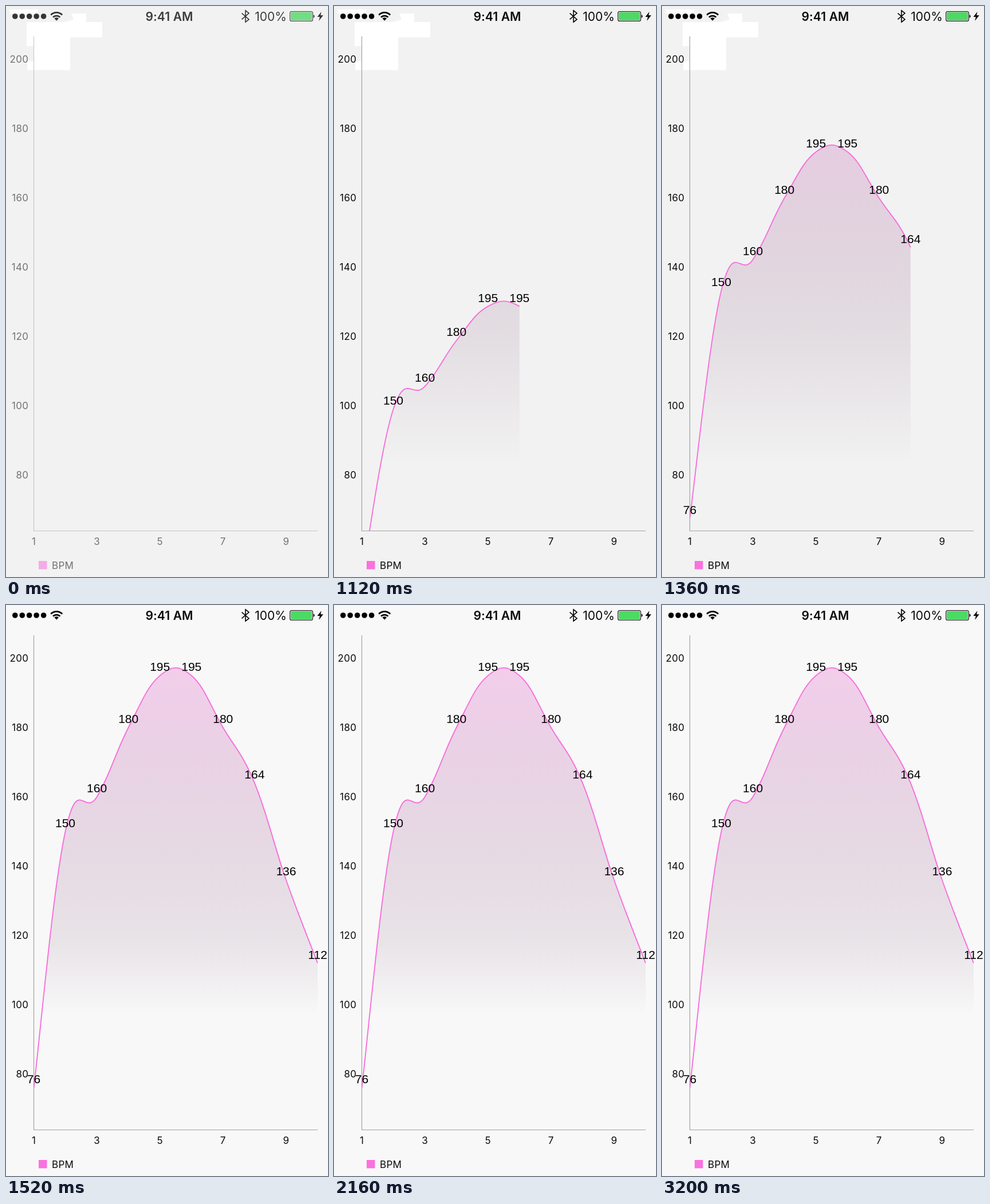
An HTML page for the animation above (3280 ms loop, 562 by 997 pixels).

```html
<!DOCTYPE html>
<html lang="en">
<head>
<meta charset="utf-8">
<title>BPM chart</title>
<style>
  html, body { margin: 0; width: 100%; height: 100%; overflow: hidden; background: #f2f2f2; }
  svg { display: block; width: 562px; height: 997px; }
  text { font: 17px Inter, Roboto, sans-serif; letter-spacing: .3px; fill: #0a0a0a; }
  #status text { font-size: 21px; letter-spacing: 0; }
  #status .clock { font-weight: 600; letter-spacing: .1px; }
  #values text { font: 21px "Liberation Sans", Arial, sans-serif; letter-spacing: 0; fill: #000; }
  .mid { text-anchor: middle; }
  .end { text-anchor: end; }
</style>
</head>
<body>
<svg viewBox="0 0 562 997" xmlns="http://www.w3.org/2000/svg">
  <defs>
    <linearGradient id="shade" gradientUnits="userSpaceOnUse" x1="0" y1="53" x2="0" y2="916">
      <stop offset="0" stop-color="#f76fdc" stop-opacity=".32"/>
      <stop offset=".628" stop-color="#5c2952" stop-opacity=".095"/>
      <stop id="fadeEnd" offset=".866" stop-color="#5c2952" stop-opacity="0"/>
    </linearGradient>
    <clipPath id="plot"><rect x="48.5" y="53" width="495.5" height="863.5"/></clipPath>
  </defs>
  <rect id="back" width="562" height="997"/>
  <path id="patch" fill="#fff" d="M7 6H56V13H7ZM114 13H140V28H168V55H112V112H37V96H48V70H36V28H102L118 24Z"/>

  <g id="status">
    <g id="dots"></g>
    <g fill="none" stroke="#000" stroke-width="2.7">
      <path d="M78.2 15.6A14 14 0 0 1 98.2 15.6"/>
      <path d="M82 19.6A8.8 8.8 0 0 1 94.4 19.6"/>
    </g>
    <path d="M84.4 21.8A5.6 5.6 0 0 1 92 21.8L88.2 25.8Z"/>
    <text class="mid clock" x="285" y="25.5">9:41 AM</text>
    <path d="M411.5 12.6L424 23.4L418 28.2V7.8L424 12.6L411.5 23.4" fill="none" stroke="#000" stroke-width="1.6"/>
    <text class="end" x="490" y="25.5">100%</text>
    <rect x="495.6" y="9.6" width="39.8" height="16.8" rx="3" fill="none" stroke="#222" stroke-width="1.2"/>
    <rect x="497" y="11" width="37" height="14" rx="1.8" fill="#4cd964"/>
    <path d="M536.6 15Q538.6 16 538.6 18T536.6 21Z"/>
    <path d="M550.5 10L543.3 19H547.8L546 26L553.7 16.3H549Z"/>
  </g>

  <g id="frame">
    <path d="M48.5 53V916.5H544" fill="none" stroke="#a2a2a2" stroke-width="1.2"/>
    <g id="ticks"></g>
    <rect x="57" y="969" width="14.5" height="14.5" fill="#f972de"/>
    <text x="80" y="983">BPM</text>
  </g>

  <g clip-path="url(#plot)">
    <path id="area" fill="url(#shade)"/>
    <path id="line" fill="none" stroke="#f76fdc" stroke-width="1.9"/>
  </g>
  <g id="values"></g>
</svg>
<script>
const LOOP = 3280, STEP = 80;
const GROW_START = 427, GROW_TIME = 1050;
const FADE_TIME = 320, SETTLE = 1440;
const BOTTOM = 916.5, TENSION = 0.2;
const bpm = [76, 150, 160, 180, 195, 195, 180, 164, 136, 112];

const $ = id => document.getElementById(id);
const clamp = v => Math.min(1, Math.max(0, v));
const px = i => 48.5 + i * 55.05;
const py = v => 93 + (200 - v) * 6.05;

function add(parent, tag, attrs, label) {
  const el = document.createElementNS("http://www.w3.org/2000/svg", tag);
  for (const k in attrs) el.setAttribute(k, attrs[k]);
  if (label !== undefined) el.textContent = label;
  return $(parent).appendChild(el);
}

for (let i = 0; i < 5; i++) add("dots", "circle", { cx: 15.8 + i * 12.45, cy: 18, r: 4.8 });
for (let v = 80; v <= 200; v += 20) add("ticks", "text", { class: "end", x: 39.3, y: py(v) + 6.1 }, v);
for (let n = 1; n < 10; n += 2) add("ticks", "text", { class: "mid", x: px(n - 1), y: 941 }, n);
const tags = bpm.map((v, i) => add("values", "text", { class: "mid", x: px(i) }, v));

// Cubic through the first `count` points, heights scaled by `phase`.
function curve(count, phase) {
  const last = bpm.length - 1;
  const at = i => {
    const k = Math.min(last, Math.max(0, i));
    return [px(k), py(bpm[k] * phase)];
  };
  const handle = (p, a, b, sign) => p.map((c, k) => c + sign * (b[k] - a[k]) * TENSION);
  let d = "M" + at(0);
  for (let i = 1; i < count; i++) {
    const a = at(i - 1), b = at(i);
    d += "C" + [handle(a, at(i - 2), b, 1), handle(b, a, at(i + 1), -1), b].join(" ");
  }
  return d;
}

function draw(ms) {
  const t = Math.floor((ms % LOOP) / STEP) * STEP;
  const fade = clamp(t / FADE_TIME);
  const phase = clamp((t - GROW_START) / GROW_TIME);
  const count = Math.floor(bpm.length * phase);
  const settled = t >= SETTLE;

  $("status").setAttribute("opacity", 0.78 + 0.22 * fade);
  $("frame").setAttribute("opacity", 0.55 + 0.45 * fade);
  $("back").setAttribute("fill", settled ? "#f8f8f8" : "#f2f2f2");
  $("patch").setAttribute("visibility", settled ? "hidden" : "visible");
  $("fadeEnd").setAttribute("offset", settled ? 0.767 : 0.866);

  const d = count > 1 ? curve(count, phase) : "";
  $("line").setAttribute("d", d);
  $("area").setAttribute("d", d && `${d}V${BOTTOM}H${px(0)}Z`);

  tags.forEach((tag, i) => {
    const y = py(bpm[i] * phase);
    tag.setAttribute("y", y - 7.8);
    tag.setAttribute("visibility", i < count && y <= BOTTOM ? "visible" : "hidden");
  });
}

const start = performance.now();
function tick() {
  draw(performance.now() - start);
  requestAnimationFrame(tick);
}
tick();
</script>
</body>
</html>
```
